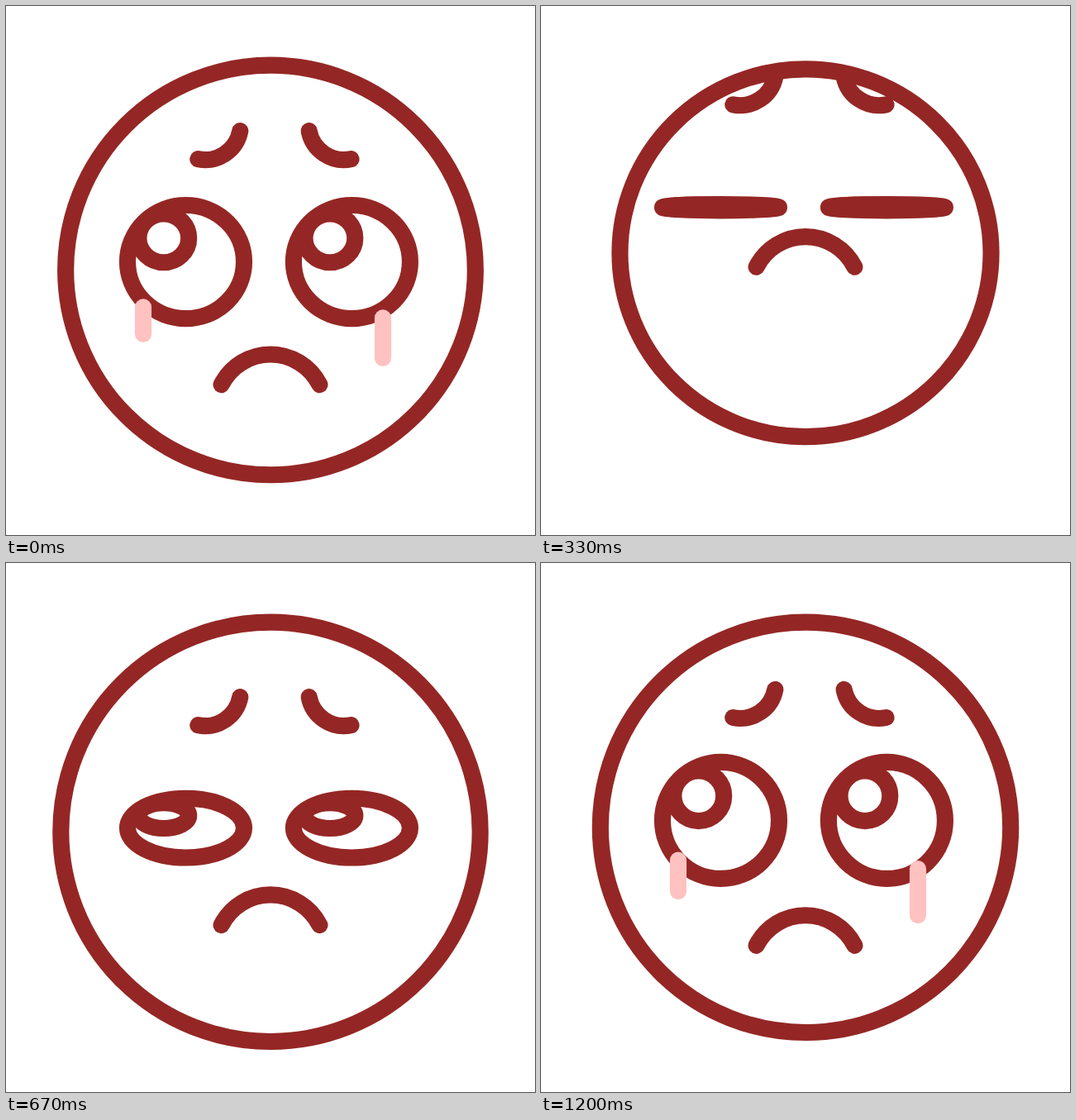
An HTML page that plays this animation: 640 px wide and 640 px high, repeating every 1670 ms.

```html
<!DOCTYPE html>
<html lang="en">
<head>
<meta charset="utf-8">
<title>Sad face</title>
<style>
  html, body { margin: 0; width: 100%; height: 100%; overflow: hidden; background: #fff; }
  svg { display: block; width: 100%; height: 100%; }
  .ink, .tear { fill: none; stroke-width: 20.15; stroke-linecap: round; }
  .ink { stroke: #942725; }
  .tear { stroke: #ffc2c1; }
</style>
</head>
<body>
<svg viewBox="0 0 640 640">
  <g class="ink">
    <ellipse id="face" cx="320"/>
    <g id="brows">
      <path d="M283.3 153A43 43 0 0 1 232.3 187"/>
      <path d="M366.6 153A43 43 0 0 0 417.6 187"/>
    </g>
    <g id="eyes">
      <ellipse cx="217.5" rx="70.5"/>
      <ellipse cx="190.8" rx="30.4"/>
      <ellipse cx="418.4" rx="70.5"/>
      <ellipse cx="391.9" rx="30.4"/>
    </g>
    <path id="mouth" d="M260.6 462.6A66.5 66.5 0 0 1 379.4 462.6"/>
  </g>
  <g id="tears">
    <line class="tear" x1="166" x2="166"/>
    <line class="tear" x1="456" x2="456"/>
  </g>
</svg>
<script>
const LOOP = 1670, STEP = 100 / 3, LAST = 36;
const $ = id => document.getElementById(id);

const ramp = (f, a, b) => Math.min(1, Math.max(0, (f - a) / (b - a)));
const ease = (f, a, b) => {
  const u = ramp(f, a, b);
  return u * u * (3 - 2 * u);
};

// Rest, dip to low, overshoot to high, back to rest; times are in steps
const bounce = (start, dip, peak, end, low, high) => f =>
  low * ease(f, start, dip) + (high - low) * ease(f, dip, peak) - high * ease(f, peak, end);

const lift = bounce(-1.3, 12.7, 22.1, 35.7, -75, 21.5);
const grow = bounce(-1, 14.4, 21, 35.3, -29.5, 7.8);
const sink = bounce(-1.4, 12.6, 23.2, 37, -161.5, 13.7);
const open = f => 1 - ease(f, -1.3, 11.8) + ease(f, 11.8, 28);

function set(el, attrs) {
  for (const k in attrs) el.setAttribute(k, attrs[k]);
}

const shiftY = (el, y) => set(el, { transform: `translate(0 ${y})` });

function drawFace(f) {
  const d = grow(f), shrink = Math.min(d, 0);
  const ry = 248.2 + d + 0.09 * shrink;
  set($('face'), { rx: 248.2 + d, ry, cy: 71.6 - 0.2 * shrink + ry });
}

function drawEyes(f) {
  const cy = 311.4 + lift(f), s = open(f);
  [...$('eyes').children].forEach((eye, i) => {
    const pupil = i % 2;
    set(eye, {
      cy: pupil ? cy - 29.6 * s : cy,
      ry: Math.max(0.5, (pupil ? 30.3 : 70.5) * s)
    });
  });
}

// Tears drain downwards, then grow again from the top, riding between eyes and mouth
function drawTears(f) {
  const draining = f < 15;
  const part = draining ? 1 - ramp(f, -1.3, 8.6) : ramp(f, 23, 31);
  const shift = draining ? -0.3 * f : (lift(f) + sink(f)) / 2;
  set($('tears'), { visibility: part > 0 ? 'visible' : 'hidden' });
  [[359.5, 397], [370, 426]].forEach(([top, end], i) => {
    const len = (end - top) * part;
    const y1 = shift + (draining ? end - len : top);
    set($('tears').children[i], { y1, y2: y1 + len });
  });
}

function draw(f) {
  drawFace(f);
  drawEyes(f);
  drawTears(f);
  shiftY($('brows'), lift(f));
  shiftY($('mouth'), sink(f));
}

let start;
function tick(now) {
  start ??= now;
  const t = (now - start) % LOOP;
  // 30 steps a second, each starting on a multiple of 10 ms
  draw(Math.min(LAST, Math.floor((Math.floor(t / 10) * 10 + 3.4) / STEP)));
  requestAnimationFrame(tick);
}
draw(0);
requestAnimationFrame(tick);
</script>
</body>
</html>
```
